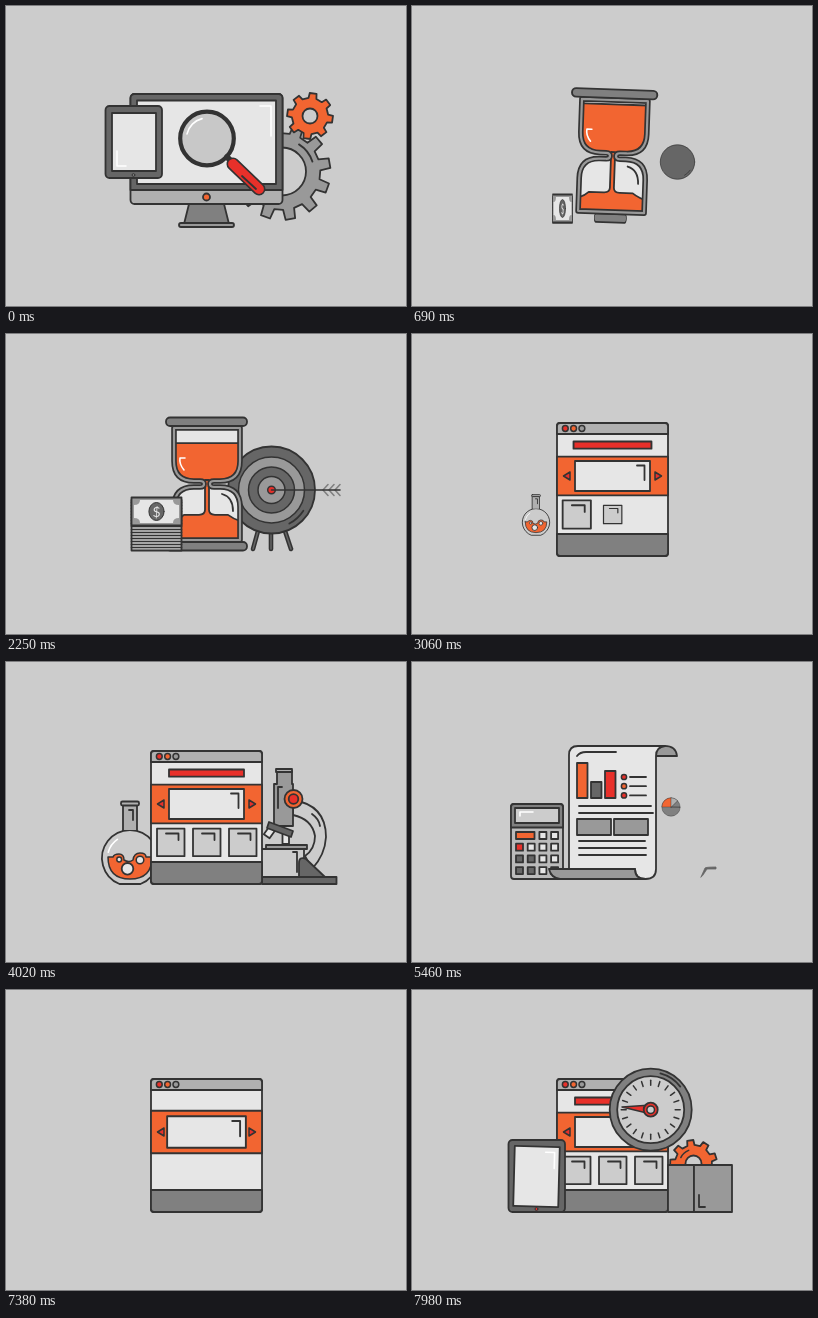
Animation of 400 by 300 pixels, one loop 8000 ms. Source, as an HTML page with a canvas:

```html
<!DOCTYPE html>
<html lang="en">
<head>
<meta charset="utf-8">
<title>Flat icon scenes</title>
<style>
html, body { margin: 0; width: 100%; height: 100%; overflow: hidden; background: #ccc; }
canvas { display: block; width: 400px; height: 300px; }
</style>
</head>
<body>
<canvas id="stage"></canvas>
<script>
const canvas = document.getElementById('stage');
const ctx = canvas.getContext('2d');
const ratio = window.devicePixelRatio || 1;
canvas.width = 400 * ratio;
canvas.height = 300 * ratio;

const LOOP = 8000, FIRST_CUT = 240, SCENE = 2230, EXIT = 170;
const INK = '#333', DARK = '#666', MID = '#808080', GRAY = '#999', SILVER = '#b0b0b0';
const BACK = '#ccc', PAPER = '#e6e6e6', ORANGE = '#f26531', RED = '#e8302a', WHITE = '#fff';
const TAU = Math.PI * 2, DEG = Math.PI / 180;
let now = 0; // time since the current scene began

// Timing
const progress = (start, dur) => Math.min(1, Math.max(0, (now - start) / dur));
const easeOut = p => 1 - (1 - p) ** 3;
const easeBack = p => p <= 0 ? 0 : 1 + 2.7 * (p - 1) ** 3 + 1.7 * (p - 1) ** 2;
const spring = (start, dur = 330) => easeBack(progress(start, dur));

// Transforms
function around(x, y, sx, sy, angle, draw) {
  if (sx < .01 || sy < .01) return;
  ctx.save();
  ctx.translate(x, y);
  ctx.rotate(angle);
  ctx.scale(sx, sy);
  ctx.translate(-x, -y);
  draw();
  ctx.restore();
}
function pop(start, x, y, draw, dur) {
  const s = spring(start, dur);
  around(x, y, s, s, 0, draw);
}
function popX(start, x, draw, dur) { around(x, 0, spring(start, dur), 1, 0, draw); }
function popY(start, y, draw, dur) { around(0, y, 1, spring(start, dur), 0, draw); }

// Shapes
function paint(path, fill, stroke = INK, width = 1.8) {
  if (fill) { ctx.fillStyle = fill; ctx.fill(path); }
  if (stroke) { ctx.strokeStyle = stroke; ctx.lineWidth = width; ctx.stroke(path); }
}
const shape = (d, fill, stroke, width) => paint(new Path2D(d), fill, stroke, width);
const line = (d, color = INK, width = 1.8) => shape(d, null, color, width);
function box(x1, y1, x2, y2, fill, radius = 0, stroke = INK, width = 1.8) {
  const path = new Path2D();
  path.roundRect(x1, y1, x2 - x1, y2 - y1, radius);
  paint(path, fill, stroke, width);
}
function disc(x, y, r, fill, stroke = INK, width = 1.8, ry = r) {
  const path = new Path2D();
  path.ellipse(x, y, r, ry, 0, 0, TAU);
  paint(path, fill, stroke, width);
}
function arc(x, y, r, from, to, color = INK, width = 1.8) {
  const path = new Path2D();
  path.arc(x, y, r, from * DEG, to * DEG);
  paint(path, null, color, width);
}
function gear(x, y, r, teeth, turn, hole, fill) {
  const path = new Path2D(), step = TAU / teeth;
  for (let i = 0; i < teeth; i++) {
    for (const [offset, radius] of [[-.28, .79], [-.19, 1], [.19, 1], [.28, .79]]) {
      const a = turn * DEG + (i + offset) * step;
      path.lineTo(x + Math.cos(a) * r * radius, y + Math.sin(a) * r * radius);
    }
  }
  path.closePath();
  paint(path, fill);
  disc(x, y, hole, BACK);
}

// Monitor, tablet, magnifier and gears
function monitorScene() {
  gear(276, 165.5, 48.5, 12, -10, 24, GRAY);
  arc(276, 165.5, 32, -58, -18);
  gear(304, 110, 23, 8, 8, 7.5, ORANGE);

  shape('M183 198H218L223 218H178Z', MID);
  box(173, 217, 228, 221, GRAY, 2);
  box(124.5, 88, 276.5, 198, SILVER, 4);
  box(124.5, 88, 276.5, 184, DARK, [4, 4, 0, 0]);
  box(131, 94.5, 270, 178, PAPER);
  line('M254 100H265V130', WHITE, 1.6);
  disc(200.5, 191, 3.5, ORANGE);

  disc(201, 132.5, 26.8, '#c8c8c8', INK, 4.2);
  arc(201, 132.5, 20.5, 193, 256, WHITE, 1.6);
  line('M221 151L228 158', INK, 6);
  line('M227 158L253 183', INK, 13);
  line('M227 158L253 183', RED, 9.8);
  line('M236 170L250 183');

  box(99.5, 100, 156, 172, DARK, 4);
  box(106, 107, 150, 165, PAPER);
  line('M111 145V160H120', WHITE, 1.6);
  disc(127.5, 169, 1.4, MID, INK, 1);
}

// Hourglass, banknotes and target
const GLASS = 'M168 94V127Q168 147 188 147H194Q198 147 198 150T194 153H188Q168 153 168 173V206' +
  'H234V173Q234 153 214 153H208Q204 153 204 150T208 147H214Q234 147 234 127V94Z';

function target() {
  const x = 265.5, y = 156;
  for (const [x1, x2] of [[252, 247], [265, 265], [279, 285]]) {
    popY(640, 197, () => {
      line(`M${x1} 197L${x2} 215`, INK, 4.6);
      line(`M${x1} 197L${x2} 215`, DARK, 1.5);
    });
  }
  pop(425, x, y, () => {
    disc(x, y, 43.5, DARK);
    arc(x, y, 38, 33, 62);
  }, 270);
  [[33, GRAY], [23, DARK], [13.5, GRAY], [3.8, RED]].forEach(([r, fill], i) =>
    pop(490 + i * 70, x, y, () => disc(x, y, r, fill, INK, 1.5), 270));
  const reach = easeOut(progress(900, 200));
  around(x, y, reach, 1, 0, () => {
    for (const fx of [317, 323, 329]) line(`M${fx + 5} 150.5L${fx} 156L${fx + 5} 161.5`, MID, 1.6);
    line('M265.5 156H334', INK, 1.6);
  });
}

function hourglass() {
  const sand = 95.2 + now * .0069, pile = 188.3 - now * .0037;
  const size = spring(0, 250), turn = (spring(40, 450) - 1) * Math.PI;
  around(200.5, 150, size, size, turn, () => {
    popX(425, 200.5, () => box(160, 208, 241, 216.5, MID, 4), 270);
    const glass = new Path2D(GLASS);
    paint(glass, PAPER, null);
    ctx.save();
    ctx.clip(glass);
    box(160, sand, 242, 151, ORANGE);
    shape(`M160 ${pile + 8}Q172 ${pile + 6} 178 ${pile}H193Q199 ${pile} 199 ${pile - 5}V146H203` +
      `V${pile - 5}Q203 ${pile} 209 ${pile}H222Q230 ${pile + 6} 242 ${pile + 8}V210H160Z`, ORANGE);
    ctx.restore();
    paint(glass, null, INK, 5.6);
    paint(glass, null, GRAY, 2.2);
    line('M179 124H174Q173 130 178 136', WHITE, 1.6);
    line('M216 160Q227 163 227 177');
    popX(240, 200.5, () => box(160, 83.5, 241, 92, MID, 4), 270);
  });
}

function banknotes() {
  popX(425, 150.5, () => {
    const lift = 25 * easeOut(progress(600, 300));
    box(125.5, 191 - lift, 175.5, 216.5, BACK);
    for (let y = 213.5; y > 191 - lift; y -= 3) line(`M125.5 ${y}H175.5`, INK, 1.6);
    ctx.save();
    ctx.translate(0, -lift);
    box(125.5, 188.5, 175.5, 216.5, GRAY);
    shape('M134 191H167Q167 196 173 196V209Q167 209 167 214H134Q134 209 128 209V196Q134 196 134 191Z', PAPER, null);
    disc(150.5, 202.5, 7.6, DARK, INK, 1, 9);
    ctx.fillStyle = PAPER;
    ctx.font = '14px Lato, sans-serif';
    ctx.textAlign = 'center';
    ctx.fillText('$', 150.5, 207.5);
    ctx.restore();
  }, 270);
}

function timeScene() {
  target();
  hourglass();
  banknotes();
}

// Browser window shared by two scenes
function browser() {
  pop(0, 200.5, 155.5, () => {
    box(145, 89, 256, 222, PAPER, 3);
    box(145, 89, 256, 100, SILVER, [3, 3, 0, 0]);
    box(145, 200, 256, 222, MID, [0, 0, 3, 3]);
    [RED, ORANGE, GRAY].forEach((fill, i) => disc(153.3 + i * 8.3, 94.5, 2.9, fill, INK, 1.5));
  }, 300);
  popY(250, 142, () => box(145, 122.7, 256, 161.4, ORANGE));
  pop(190, 200.5, 142, () => {
    box(163, 127, 238, 157, PAPER);
    line('M225 131.5H232.5V146');
  });
  pop(200, 154.5, 142, () => shape('M151.5 142L158 138V146Z', RED, INK, 1.5), 230);
  pop(200, 246, 142, () => shape('M249.5 142L243 138V146Z', RED, INK, 1.5), 230);
  popX(455, 200.5, () => box(163, 107.5, 238, 114.7, RED));
  [151, 187, 223].forEach((x, i) => pop(460 + i * 70, x + 13.5, 180.5, () => {
    box(x, 166.7, x + 27.5, 194.2, BACK);
    line(`M${x + 9} 171.5H${x + 21.5}V178`);
  }));
}

function flask() {
  pop(550, 124, 181, () => {
    box(117, 143, 131, 175, SILVER);
    shape('M113.5 222A28 28 0 1 1 134.5 222Z', BACK);
    box(118, 150, 130, 168, SILVER, 0, null);
    shape('M102 195H107Q108 192 113 192T118 198Q123 201 127 198Q128 191 134 191T140 195H146' +
      'Q146 217 124 217T102 195Z', ORANGE, INK, 1.5);
    line('M123 148H127V158');
    disc(113.2, 197.5, 2.4, PAPER, INK, 1.5);
    disc(134, 198, 3.8, PAPER, INK, 1.5);
    disc(121.5, 206.8, 5.8, PAPER);
    arc(124, 196, 22.5, 195, 236, WHITE, 1.6);
    box(115, 139.5, 133, 143.5, SILVER, 1.5);
  });
}

function microscope() {
  pop(810, 293, 165, () => {
    shape('M287 138Q320 143 320 175Q319 193 306 207L299 194Q309 187 309 174Q306 157 287 153Z', BACK);
    line('M306 152Q313 157 314 164');
    box(250, 187, 298, 215, BACK);
    line('M287 190H291V210');
    shape('M293 215V201Q293 194 300 197L319 215Z', DARK);
    box(256, 215, 330.5, 222, DARK);
    box(260, 183, 301, 187, GRAY);
    box(276.5, 172, 283, 182, PAPER);
    around(263, 171, 1, 1, 35 * DEG, () => box(259.5, 166, 266.5, 175, PAPER));
    shape('M268 122H271V109H286V122H287V164H268Z', GRAY);
    box(270, 107, 286, 110, SILVER);
    line('M276 125H272V146');
    shape('M263 160L287 169L285 175L261 166Z', DARK);
    disc(287.5, 137, 9, ORANGE);
    disc(287.5, 137, 4.8, RED);
  });
}

function scienceScene() {
  flask();
  microscope();
  browser();
}

// Report, calculator, pie chart and glasses
function pieSlice(from, to, fill) {
  const path = new Path2D();
  path.moveTo(259, 145);
  path.arc(259, 145, 43, from * DEG, to * DEG);
  path.closePath();
  paint(path, fill);
}

function calculator() {
  pop(330, 125, 179.5, () => {
    box(99, 142, 151, 217, '#bbb', 3);
    box(99, 142, 151, 165.5, MID, [3, 3, 0, 0]);
    box(103, 146, 147, 161, BACK);
    line('M108 154V150H121', WHITE, 1.6);
  });
  popX(480, 113.5, () => box(104, 170, 122.5, 177, ORANGE), 200);
  const keys = [
    [null, null, PAPER, PAPER],
    [RED, PAPER, PAPER, PAPER],
    [DARK, DARK, PAPER, PAPER],
    [DARK, DARK, PAPER, DARK]
  ];
  keys.forEach((row, r) => row.forEach((fill, c) => {
    const x = 104 + c * 11.7, y = 170 + r * 11.7;
    if (fill) pop(480 + (r + c) * 12, x + 3.5, y + 3.5, () => box(x, y, x + 7, y + 7, fill), 200);
  }));
}

function report() {
  pop(80, 200.5, 150, () => {
    shape('M250 84Q264 83 265 94H244Q243 84 250 84Z', GRAY);
    shape('M157 208V93Q157 84 166 84H253Q244 85 244 94V207Q244 217 233.5 217T223 207Z', PAPER);
    shape('M137 207H223Q223 217 233.5 217H148Q139 216 137 207Z', GRAY);
    line('M165 94Q168 90 174 90H204');
  }, 350);
  [[165, 101, ORANGE], [179, 120, DARK], [193, 109, RED]].forEach(([x, y, fill], i) =>
    popY(350 + i * 40, 136, () => box(x, y, x + 10.5, 136, fill), 300));
  [RED, ORANGE, RED].forEach((fill, i) => {
    const y = 115 + i * 9.2;
    pop(400 + i * 40, 212, y, () => disc(212, y, 2.6, fill, INK, 1.5), 250);
    popX(440 + i * 30, 218, () => line(`M218 ${y}H234`), 250);
  });
  [[144, 239], [151, 241], [179, 233], [186, 234], [193, 234]].forEach(([y, end], i) =>
    popX(430 + i * 20, 167, () => line(`M167 ${y}H${end}`), 250));
  [165, 202].forEach((x, i) =>
    pop(430 + i * 40, x + 17, 165, () => box(x, 157, x + 34, 173, GRAY), 280));
}

function glasses() {
  if (now > 740) shape('M289 215L293 206Q294 205 304 205V207H295L291 213Z', DARK, DARK, .8);
  [257, 280].forEach((x, i) => pop(775 + i * 40, x, 211, () =>
    disc(x, 211, 8.5, PAPER, INK, 2, 6)));
  popX(830, 268.5, () => line('M265 209Q268.5 206 272 209'));
}

function reportScene() {
  pop(745, 259, 145, () => {
    pieSlice(0, 360, MID);
    pieSlice(180, 270, ORANGE);
    pieSlice(270, 315, SILVER);
  });
  glasses();
  calculator();
  report();
}

// Browser with gauge, tablet and a gear in a box
function gauge() {
  const x = 238.7, y = 119.7;
  pop(580, x, y, () => {
    disc(x, y, 41, MID);
    disc(x, y, 33.5, BACK);
    arc(x, y, 37.5, -75, -38);
    for (let i = 0; i < 20; i++) {
      around(x, y, 1, 1, i * 18 * DEG, () => line(`M${x + 24.5} ${y}H${x + 29.5}`, INK, 1.5));
    }
  });
  pop(700, x, y, () => {
    around(x, y, 1, 1, (spring(780, 270) - 1) * 150 * DEG, () =>
      shape('M210 117L239 115V124Z', RED, INK, 1.5));
    disc(x, y, 7, RED);
    disc(x, y, 3.8, BACK, INK, 1.5);
  }, 280);
}

function dashboardScene() {
  browser();
  const rise = 30 * (1 - spring(700));
  if (now > 700) {
    ctx.save();
    ctx.beginPath();
    ctx.rect(245, 100, 90, 75);
    ctx.clip();
    gear(281.5, 173.5 + rise, 23.5, 9, -18, 8, ORANGE);
    arc(281.5, 173.5 + rise, 14, 205, 250, INK, 1.5);
    ctx.restore();
  }
  pop(550, 288, 198.5, () => {
    box(256, 175, 282, 222, GRAY);
    box(282, 175, 320, 222, GRAY);
    line('M287 205V217H293');
  });
  gauge();
  pop(520, 124.5, 186, () => box(96.5, 150, 153, 222, DARK, 4));
  const size = spring(650, 280), turn = (spring(650, 450) - 1) * 90 * DEG;
  around(124.5, 186.5, size, size, turn, () => {
    box(102, 156.5, 147, 216.5, PAPER);
    line('M133 162H142V178', WHITE, 1.6);
  });
  pop(700, 124.5, 219, () => disc(124.5, 219, 1.5, RED, INK, 1), 200);
}

const scenes = [monitorScene, timeScene, scienceScene, reportScene, dashboardScene];

function frame(time) {
  const clock = time % LOOP + SCENE - FIRST_CUT;
  const index = Math.floor(clock / SCENE);
  now = clock - index * SCENE;
  ctx.setTransform(ratio, 0, 0, ratio, 0, 0);
  ctx.lineJoin = ctx.lineCap = 'round';
  ctx.fillStyle = BACK;
  ctx.fillRect(0, 0, 400, 300);
  const size = 1 - progress(SCENE - EXIT, EXIT) ** 2;
  around(200.5, 155, size, size, 0, scenes[index]);
  requestAnimationFrame(() => frame(performance.now() - begin));
}
const begin = performance.now();
frame(0);
</script>
</body>
</html>
```
